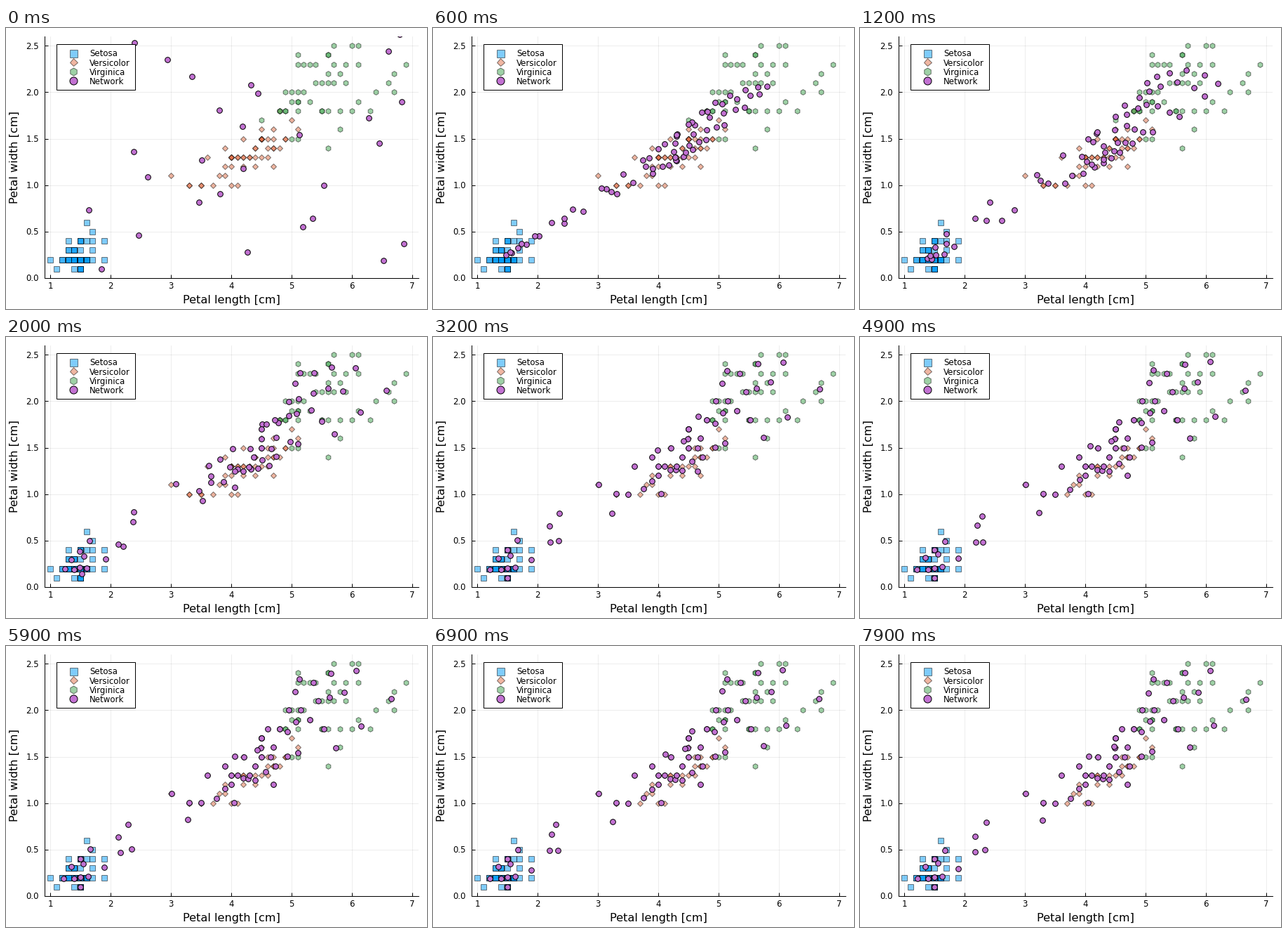
Recreate the animation shown at these times as a matplotlib script. Size 600 by 400 pixels, loop 8 s.

```python
import numpy as np
import matplotlib.pyplot as plt
from matplotlib.animation import FuncAnimation
from matplotlib.patches import Rectangle

W, H, DPI = 600, 400, 100
FRAMES, STEP = 80, 100
LEFT, RIGHT, TOP, BOTTOM = 54.5, 587.5, 12, 356
X0, X1, Y1 = 0.9, 7.1, 2.6
PT = 72 / DPI
GRID = 8

plt.rcParams["font.family"] = "DejaVu Sans"

# iris samples: petal width -> petal lengths, in millimetres
SETOSA = {
    1: [11, 14] + [15] * 4,
    2: [10] + [12] * 2 + [13] * 4 + [14] * 8 + [15] * 6 + [16] * 5 + [17, 19],
    3: [13] * 2 + [14] * 3 + [15, 17],
    4: [13] + [15] * 3 + [16, 17, 19],
    5: [17], 6: [16],
}
VERSICOLOR = {
    10: [33, 35] * 2 + [37, 40, 41],
    11: [30, 38, 39],
    12: [39, 40, 42, 44, 47],
    13: [36, 40, 40] + [40, 41, 42, 43] * 2 + [44, 45, 46][:3],
    14: [39, 46, 48] + [44, 47] * 2,
    15: [42, 46, 47] + [45] * 5 + [49] * 2,
    16: [45, 47, 51], 17: [50], 18: [48],
}
VIRGINICA = {
    14: [56], 15: [50, 51], 16: [58], 17: [45],
    18: [48, 49, 55] * 2 + [51, 56, 58, 60, 63],
    19: [50, 51, 51, 53, 61],
    20: [*range(49, 53), 64, 67],
    21: [*range(54, 58), 59, 66],
    22: [56, 58, 67],
    23: [*range(51, 55), *range(57, 63, 2), 69],
    24: [51, 56, 56], 25: [57, 60, 61],
}


def points(rows):
    return np.array([(x, w) for w, xs in rows.items() for x in xs]) / 10


def train(samples, rng):
    """Poses of a self-organising map, one batch update per frame."""
    n = GRID * GRID
    cells = np.array([(i, j) for i in range(GRID) for j in range(GRID)])
    gap2 = ((cells[:, None] - cells) ** 2).sum(axis=2)

    # scattered first pose, more than half of it above the plot
    poses = [np.column_stack([rng.uniform(1.4, 7, n), 0.1 + 0.09 * rng.permutation(n)])]

    # the sheet starts with its diagonal along the data
    i, j = cells.T
    along, across = i + j - GRID + 1, i - j
    nodes = (samples.mean(axis=0) + np.outer(along, (0.4, 0.16))
             + np.outer(across, (-0.03, 0.06)))

    for k in range(1, FRAMES):
        sigma = max(0.3, 3 * np.exp(-k / 11))
        dist2 = ((samples[:, None] - nodes) ** 2).sum(axis=2)
        best = dist2.argmin(axis=1)
        pull = np.exp(-gap2[:, best] / (2 * sigma ** 2))
        pull *= rng.uniform(0.8, 1.2, len(samples))
        nodes = pull @ samples / pull.sum(axis=1, keepdims=True)
        poses.append(nodes)
    return poses


species = [points(s) for s in (SETOSA, VERSICOLOR, VIRGINICA)]
poses = train(np.vstack(species), np.random.default_rng(4))

fig = plt.figure(figsize=(W / DPI, H / DPI), dpi=DPI, facecolor="white")

stage = fig.add_axes([0, 0, 1, 1], zorder=2)
stage.set(xlim=(0, W), ylim=(H, 0))
stage.axis("off")

ax = fig.add_axes([LEFT / W, 1 - BOTTOM / H, (RIGHT - LEFT) / W, (BOTTOM - TOP) / H])
ax.set(xlim=(X0, X1), ylim=(0, Y1), xticks=range(1, 8), yticks=np.arange(0, 2.6, 0.5))
ax.set_axisbelow(True)
ax.grid(color="black", alpha=0.1, lw=0.5)
ax.tick_params(direction="in", length=5 * PT, width=PT,
               labelbottom=False, labelleft=False)
for side in ("top", "right"):
    ax.spines[side].set_visible(False)
for side in ("left", "bottom"):
    ax.spines[side].set_linewidth(PT)


def label(x, y, text, size=8.5, **kw):
    stage.text(x, y, text, fontsize=size, **kw)


for v in ax.get_xticks():
    label(LEFT + (v - X0) / (X1 - X0) * (RIGHT - LEFT), 371, f"{v:.0f}", ha="center")
for v in ax.get_yticks():
    label(47, BOTTOM - v / Y1 * (BOTTOM - TOP) + 4.3, f"{v:.1f}", ha="right")
label(321.5, 392, "Petal length [cm]", 11.6, ha="center")
label(19.5, 184, "Petal width [cm]", 11.6, rotation=90, ha="right", va="center")

stage.add_patch(Rectangle((71.5, 22.5), 112, 65, fc="white", ec="black", lw=PT))


def marker(shape, size, color, alpha):
    side = size / np.sqrt(2) if shape == "D" else size
    return dict(ls="", marker=shape, ms=side * PT, mfc=color, mec="black",
                mew=PT, alpha=alpha, snap=False)


styles = [
    ("Setosa", "s", "#009afa", 0.5),
    ("Versicolor", "D", "#e36f47", 0.5),
    ("Virginica", "h", "#3ea44e", 0.5),
    ("Network", "o", "#c271d2", 1),
]
for i, (name, shape, color, alpha) in enumerate(styles):
    y = 36.2 + 13 * i
    stage.plot([96], [y], **marker(shape, 11, color, alpha))
    label(119, y + 4.3, name)
    xy = (species + poses[:1])[i]
    dots, = ax.plot(*xy.T, zorder=3 + i, **marker(shape, 7.7, color, alpha))


def update(k):
    dots.set_data(*poses[k].T)
    return dots,


anim = FuncAnimation(fig, update, frames=FRAMES, interval=STEP,
                     repeat=True, repeat_delay=0)
plt.show()
```
